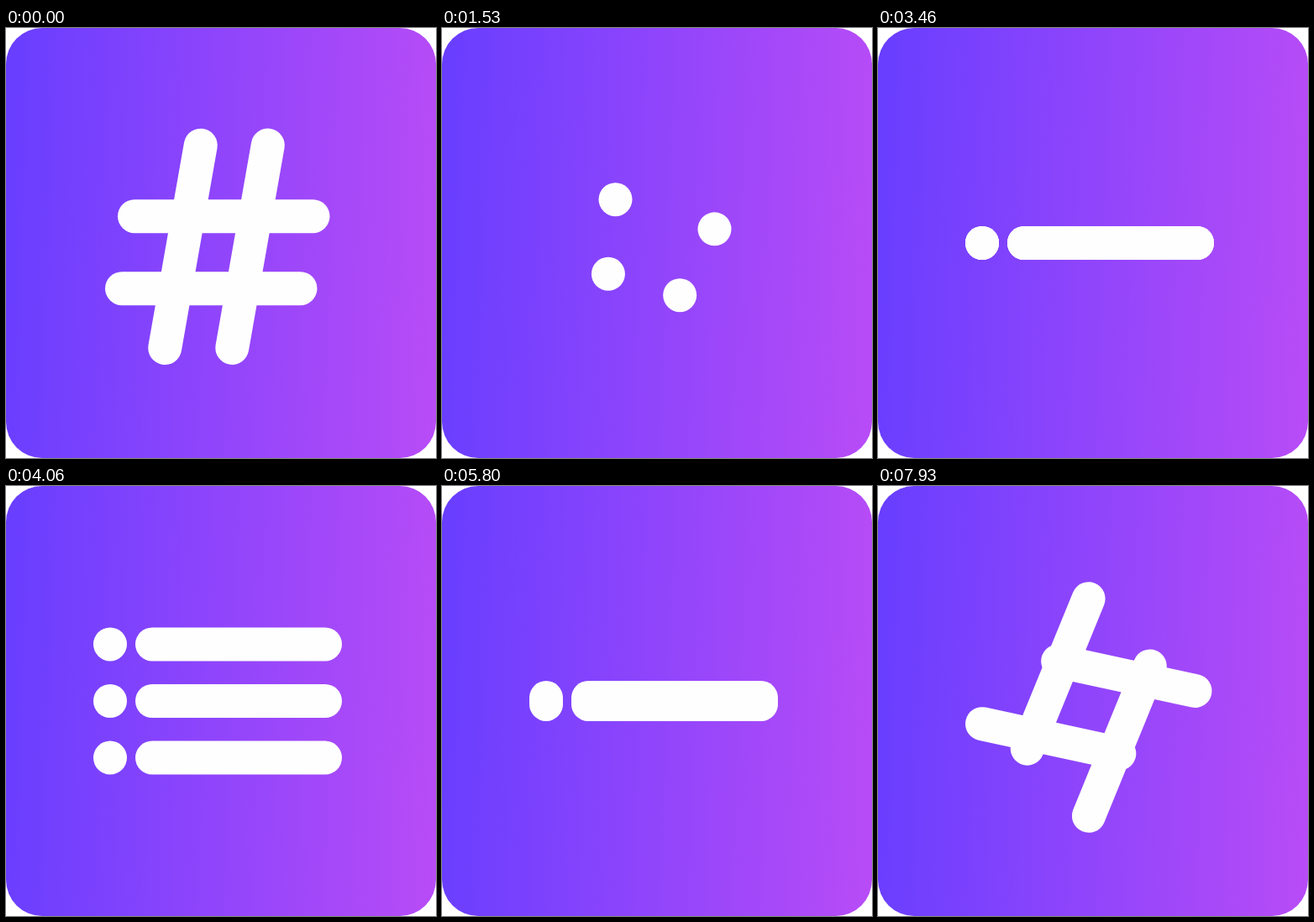
Recreate the animation shown at these times as an HTML page with a canvas. Size 512 by 512 pixels, loop 8000 ms.

```html
<!DOCTYPE html>
<html lang="en">
<head>
<meta charset="utf-8">
<title>Hash to list</title>
<style>
  html, body { margin: 0; width: 100%; height: 100%; overflow: hidden; background: #fff; }
  canvas { display: block; width: 512px; height: 512px; border-radius: 43px;
    background: linear-gradient(92deg, #683eff, #b84cf7); }
</style>
</head>
<body>
<canvas width="512" height="512"></canvas>
<script>
const ctx = document.querySelector('canvas').getContext('2d');
const LOOP = 8000, STEPS_PER_MS = 0.015;
const CENTER = 256, ORBIT_Y = 253.7, ORBIT_R = 70;
const GATHER = 225; // orbit angle where the dots meet, in degrees

const smooth = u => u * u * (3 - 2 * u);
const cubic = u => u < 0.5 ? 4 * u ** 3 : 1 - 4 * (1 - u) ** 3;
const clamp = u => Math.min(1, Math.max(0, u));
const ramp = (t, start, length) => smooth(clamp((t - start) / length));
const lerp = (a, b, k) => a + (b - a) * k;
const mix = (a, b, k) => a.map((v, i) => lerp(v, b[i], k));

// The hash is two strokes, each repeated by a half turn about its hub.
// A stroke first shoots out of its dot, then its inner end slides from hold to inner.
const REACHED = 0.863, GROWN = 0.785;
const CORNER = ORBIT_R * Math.SQRT1_2;
const DOT_HUB = [CENTER + ORBIT_Y - CENTER, CENTER], HOLD_HUB = [252.5, 264.5];
const BAR = { slant: 180, length: 212.5, hub: [251.75, 267.2],
  dot: [CORNER, CORNER], hold: [47, 46], inner: [98.75, 43] };
const STEM = { slant: 100, length: 245, hub: [250.5, 260.3],
  dot: [CORNER, -CORNER], hold: [61, -63], inner: [61.3, -120.7] };

function line(x1, y1, x2, y2) {
  ctx.beginPath();
  ctx.moveTo(x1, y1);
  ctx.lineTo(x2 + 0.01, y2);
  ctx.stroke();
}
const dot = (x, y) => line(x, y, x, y);

function drawHash(u) {
  const p = cubic(clamp(u));
  const reach = clamp(p / REACHED), slide = clamp((p - REACHED) / (1 - REACHED));
  ctx.save();
  ctx.translate(CENTER, CENTER);
  ctx.rotate((1 - p) * Math.PI / 2);
  ctx.translate(-CENTER, -CENTER);
  for (const s of [BAR, STEM]) {
    const [hubX, hubY] = mix(mix(DOT_HUB, HOLD_HUB, reach), s.hub, slide);
    const [x, y] = mix(mix(s.dot, s.hold, reach), s.inner, slide);
    const length = s.length * lerp(GROWN * reach, 1, slide);
    const a = s.slant * Math.PI / 180;
    const endX = x + length * Math.cos(a), endY = y + length * Math.sin(a);
    for (const side of [1, -1]) {
      line(hubX + side * x, hubY + side * y, hubX + side * endX, hubY + side * endY);
    }
  }
  ctx.restore();
}

// Dots on the orbit; toCenter pulls them to the middle of the stage.
function drawOrbit(angleOf, toCenter) {
  for (let i = 0; i < 4; i++) {
    const a = angleOf(i) * Math.PI / 180;
    dot(lerp(CENTER + ORBIT_R * Math.cos(a), CENTER, toCenter),
        lerp(ORBIT_Y + ORBIT_R * Math.sin(a), CENTER, toCenter));
  }
}

function drawList(t) {
  const open = ramp(t, 3033, 400) - ramp(t, 5967, 400);
  const spread = 80 * (ramp(t, 3566, 667) - ramp(t, 5233, 655));
  for (const row of [-1, 0, 1]) {
    const y = CENTER + row * spread;
    dot(CENTER - 132 * open, y);
    line(CENTER - 82 * open, y, CENTER + 124 * open, y);
  }
}

function draw(t) {
  ctx.clearRect(0, 0, 512, 512);
  ctx.strokeStyle = '#fefefe';
  ctx.lineWidth = 40;
  ctx.lineCap = 'round';
  if (t < 1390) {
    drawHash(1 - (t - 700) / 740);
  } else if (t < 2400) {
    const spacing = 90 * (1 - ramp(t, 1380, 700));
    drawOrbit(i => GATHER - i * spacing, ramp(t, 2080, 270));
  } else if (t < 6500) {
    drawList(t);
  } else if (t < 7433) {
    const sweep = 270 * ramp(t, 6760, 673);
    drawOrbit(i => GATHER + Math.min(sweep, i * 90), 1 - ramp(t, 6567, 195));
  } else {
    drawHash((t - 7433) / 740);
  }
}

// Time advances in even steps, fifteen per second.
function frame() {
  const t = performance.now() % LOOP;
  draw(Math.floor((t + 7) * STEPS_PER_MS) / STEPS_PER_MS % LOOP);
  requestAnimationFrame(frame);
}
frame();
</script>
</body>
</html>
```
